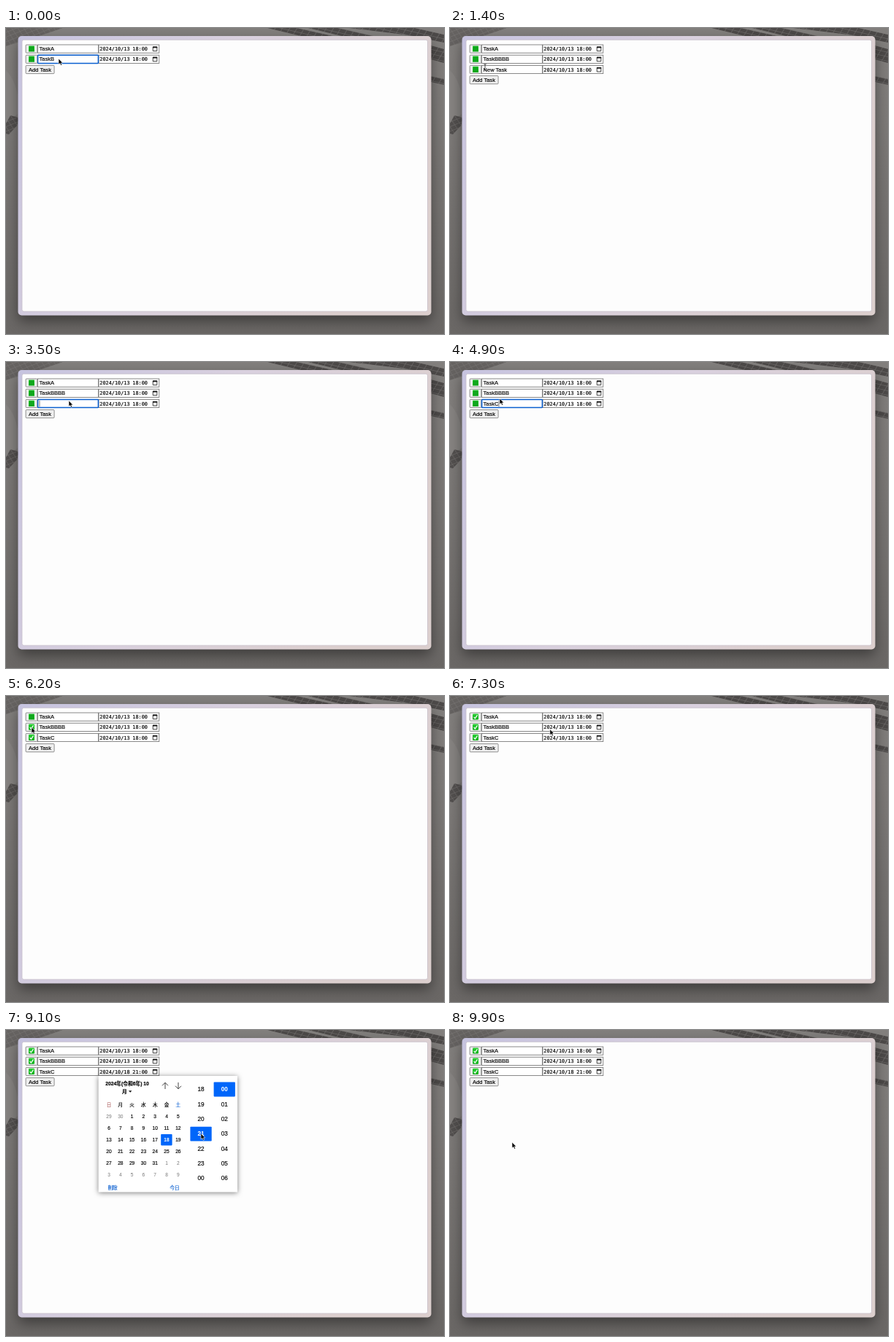
Recreate the animation shown at these times as an HTML page. Size 600 by 420 pixels, loop 10 s.

```html
<!DOCTYPE html>
<html lang="en">
<head>
<meta charset="utf-8">
<title>Task list</title>
<style>
html, body { margin: 0; width: 100%; height: 100%; overflow: hidden; background: #74716f; }
svg { display: block; width: 600px; height: 420px; }
text { font: 7.55px "Liberation Sans", Arial, sans-serif; fill: #000; stroke: #000; stroke-width: .16px; }
.mono { font: 6.85px "DejaVu Sans Mono", monospace; }
.cal text { font: 6.6px "Liberation Sans", "Noto Sans CJK JP", "Noto Sans CJK", sans-serif; text-anchor: middle; }
.cal .time { font-size: 8.2px; }
.cal .head { font-size: 6.75px; font-weight: bold; }
.cal .on { fill: #fff; stroke: none; font-weight: bold; }
.cal .dim { fill: #777; stroke: none; }
.cal .sun { fill: #a04848; stroke: none; }
.cal .link { fill: #0b5fd0; stroke: #0b5fd0; }
.box { fill: #fff; stroke: #6c6c6c; stroke-width: .8; }
.btn { fill: #efefef; stroke: #6c6c6c; stroke-width: .75; }
.frame { filter: drop-shadow(0 8px 9px rgba(0, 0, 0, .42)); }
.panel { filter: drop-shadow(0 1px 3.5px rgba(0, 0, 0, .5)); }
</style>
</head>
<body>
<svg viewBox="0 0 600 420">
  <defs>
    <linearGradient id="ground" x2="0" y2="1">
      <stop offset="0" stop-color="#827f7d"/>
      <stop offset=".3" stop-color="#7d7a78"/>
      <stop offset="1" stop-color="#6a6765"/>
    </linearGradient>
    <linearGradient id="edge" x2="1" y2=".35">
      <stop offset="0" stop-color="#c6c3df"/>
      <stop offset=".5" stop-color="#d9d0de"/>
      <stop offset="1" stop-color="#dccfce"/>
    </linearGradient>
    <linearGradient id="green" x2="0" y2="1">
      <stop offset="0" stop-color="#2ad033"/>
      <stop offset="1" stop-color="#0cae1b"/>
    </linearGradient>
    <pattern id="tiles" width="9" height="6" patternUnits="userSpaceOnUse" patternTransform="rotate(13) skewX(-18)">
      <path d="M0 0H9V6H0Z" fill="#716e6c"/>
      <path d="M0 0H8.3V5.4H0Z" fill="#4d4a49"/>
    </pattern>
    <pattern id="tilesLeft" width="7" height="6" patternUnits="userSpaceOnUse" patternTransform="rotate(-22) skewX(12)">
      <path d="M0 0H7V6H0Z" fill="#716e6c"/>
      <path d="M0 0H6.4V5.4H0Z" fill="#53504f"/>
    </pattern>
    <clipPath id="hours"><path d="M250 70H316V214H250Z"/></clipPath>
  </defs>

  <path d="M0 0H600V420H0Z" fill="url(#ground)"/>
  <path d="M0 58Q12 70 16 92V118L0 130Z" fill="#868381"/>
  <g fill="url(#tilesLeft)">
    <path d="M0 0H78L48 10L0 25Z" opacity=".6"/>
    <path d="M6 120L18 123L15 134L4 146L0 145V131Z"/>
  </g>
  <g fill="url(#tiles)">
    <path d="M358 0H398L452 12H408Z"/>
    <path d="M414 0H455L512 13H468Z"/>
    <path d="M470 0H560L600 9V20L545 9Z"/>
    <path d="M582 24L600 29V48L582 43Z"/>
    <path d="M582 66L600 70V78L582 74Z"/>
  </g>
  <rect class="frame" x="16.5" y="11" width="566" height="383.5" rx="5" fill="url(#edge)"/>
  <rect x="22" y="16.3" width="555.5" height="372.7" rx="2.5" fill="#fdfdfd" stroke="#c3bbc6" stroke-width=".7"/>
  <g id="app"></g>
</svg>
<script>
const LOOP = 10000, STEP = 100, PITCH = 14.2;
const app = document.getElementById('app');
const BLUE = '#0066fa';

// Pointer path: time, x, y
const path = [
  [0, 72, 42], [600, 72, 42], [950, 46, 57], [1100, 46, 57], [1400, 48, 53],
  [1700, 45, 56], [2300, 86, 56], [2700, 86, 53], [4300, 86, 53], [4800, 68, 50],
  [5000, 68, 50], [5400, 35, 58], [5600, 35, 58], [6000, 35, 43], [6300, 35, 43],
  [6600, 35, 28], [6900, 35, 28], [7600, 203, 57], [8200, 203, 57], [8500, 221, 151],
  [8700, 221, 151], [9000, 267, 142], [9300, 267, 142], [9700, 85, 154], [LOOP, 85, 154]
];

const label = (x, y, s, cls = '') => `<text class="${cls}" x="${x}" y="${y}">${s}</text>`;
const rect = (x, y, w, h, attr) => `<rect x="${x}" y="${y}" width="${w}" height="${h}" ${attr}/>`;
const pad = n => String(n).padStart(2, '0');
const ease = p => p * p * (3 - 2 * p);
const typed = (s, t, start, gap) => s.slice(0, Math.max(0, Math.floor((t - start) / gap) + 1));

const ruler = document.createElement('canvas').getContext('2d');
ruler.font = '7.55px "Liberation Sans", Arial, sans-serif';
const widthOf = s => ruler.measureText(s).width;

function pointerAt(t) {
  const i = path.findIndex(p => p[0] > t);
  const [t0, x0, y0] = path[i - 1], [t1, x1, y1] = path[i];
  const p = ease((t - t0) / (t1 - t0));
  return [x0 + (x1 - x0) * p, y0 + (y1 - y0) * p];
}

function pointer(t) {
  const [x, y] = pointerAt(t);
  const beam = t >= 1300 && t < 2700;
  const d = beam
    ? 'M-1.7-3.6Q0-3.6 0-2.4Q0-3.6 1.7-3.6M0-2.4V4M-1.7 5.2Q0 5.2 0 4Q0 5.2 1.7 5.2'
    : 'M0 0V8.1L1.9 6.4L3.2 9.3L4.6 8.7L3.4 5.9H5.7Z';
  const look = beam ? 'fill="none" stroke="#222" stroke-width=".8"' : 'fill="#000" stroke="#fff" stroke-width=".6"';
  return `<path transform="translate(${x} ${y})" d="${d}" ${look}/>`;
}

function status(y, done) {
  let s = rect(31, y - 4.2, 8, 8.2, `rx="${done ? 1.3 : .6}" fill="url(#green)"`);
  if (done) s += `<path d="M32.7 ${y + .2}L34.4 ${y + 2.2}L37.5 ${y - 2.5}" fill="none" stroke="#fff" stroke-width="1.2"/>`;
  else s += rect(32.2, y - 3, 5.6, 5.8, 'fill="#0fa91d" stroke="#0c9018" stroke-width=".4"');
  return s;
}

function row(i, { name, done, day = 13, hour = 18, focus, selected, caret }) {
  const y = 28.6 + i * PITCH, base = y + 2.5;
  let s = rect(27.1, y - 5.6, 15.8, 11.2, 'rx="1" class="btn"') + status(y, done);
  s += rect(43.4, y - 5.6, 83, 11.2, 'class="box"');
  s += rect(127, y - 5.6, 82.8, 11.2, 'class="box"');
  if (focus) s += rect(43.6, y - 5.6, 82.8, 11.2, 'rx=".8" fill="#fff" stroke="#0a5fd0" stroke-width="1.5"');
  if (selected) s += rect(45.5, y - 4.2, selected, 8.6, 'fill="#b4d5fe"');
  s += label(45.5, base, name);
  if (caret) s += rect(45.7 + widthOf(name), y - 4.2, .6, 8.6, 'fill="#222"');
  s += label(128.3, base, `2024/10/${day}`, 'mono') + label(173.3, base, `${hour}:00`, 'mono');
  s += `<path d="M201.3 ${y - 2.6}H206.8V${y + 3}H201.3Z" fill="none" stroke="#111" stroke-width=".8"/>`;
  s += rect(201, y - 3, 6.2, 1.7, 'fill="#111"');
  return s;
}

function calendar(t, day) {
  let s = rect(126.7, 63, 190.3, 159.5, 'class="panel" fill="#fff"');
  s += label(166, 76.4, '2024年(令和6年) 10', 'head') + label(162.5, 86.8, '月', 'head');
  s += '<path d="M168 83.3H172.4L170.2 85.8Z" fill="#111"/>';
  s += '<path d="M218 81V72.3M214 76.3L218 72.3L222 76.3M236 72V80.8M232 76.8L236 80.8L240 76.8" fill="none" stroke="#222" stroke-width=".85"/>';
  [...'日月火水木金土'].forEach((d, i) => {
    s += label(141 + i * 15.8, 104.8, d, i ? (i > 5 ? 'link' : '') : 'sun');
  });
  for (let i = 0; i < 42; i++) {
    const n = i - 1, x = 141 + i % 7 * 15.8, y = 119 + Math.floor(i / 7) * 15.9;
    const on = n === day;
    if (on) s += rect(x - 7.8, y - 7.8, 15.4, 15.4, `rx=".8" fill="${BLUE}"`);
    const shown = n < 1 ? n + 30 : n > 31 ? n - 31 : n;
    s += label(x, y + 2.3, shown, on ? 'on' : n < 1 || n > 31 ? 'dim' : '');
  }
  s += label(146, 219.4, '削除', 'link') + label(231, 219.4, '今日', 'link');

  const hour = t < 9100 ? 18 : 21;
  const scroll = 3 * ease(Math.min(1, Math.max(0, (t - 9100) / 300)));
  const column = (x, first, mod, chosen, offset) => {
    for (let k = 0; k < 11; k++) {
      const y = 81.4 + (k - offset) * 20.35, n = (first + k) % mod, on = n === chosen;
      if (on) s += rect(x - 14.6, y - 9.8, 29.3, 19.8, `rx=".8" fill="${BLUE}"`);
      if (y < 212) s += label(x, y + 2.8, pad(n), on ? 'time on' : 'time');
    }
  };
  s += '<g clip-path="url(#hours)">';
  column(267, 18, 24, hour, scroll);
  column(299.2, 0, 60, 0, 0);
  return `<g class="cal">${s}</g></g>`;
}

function draw(t) {
  const blink = t % 1000 >= 500;
  const day = t < 8600 ? 13 : 18, hour = t < 9100 ? 18 : 21;
  const rows = [
    { name: 'TaskA', done: t >= 6700 },
    { name: 'TaskB' + typed('BBB', t, 200, 150), done: t >= 6100, focus: t < 1000, caret: t < 1000 && blink }
  ];
  if (t >= 1100) {
    const editing = t >= 1700 && t < 5500;
    const name = t < 2900 ? 'New Task' : typed('TaskC', t, 3800, 200);
    const selected = t >= 1700 && t < 2900 ? Math.min(widthOf(name), Math.max(0, pointerAt(t)[0] - 45.5)) : 0;
    rows.push({ name, done: t >= 5500, day, hour, focus: editing, selected, caret: editing && t >= 2900 && blink });
  }
  const y = 28.6 + rows.length * PITCH;
  app.innerHTML = rows.map((r, i) => row(i, r)).join('')
    + rect(27.1, y - 5.6, 39, 11.2, 'rx="1" class="btn"') + label(31, y + 2.5, 'Add Task')
    + (t >= 7800 && t < 9700 ? calendar(t, day) : '') + pointer(t);
}

let last = -1;
function tick() {
  const t = Math.floor(performance.now() % LOOP / STEP) * STEP;
  if (t !== last) draw(last = t);
  requestAnimationFrame(tick);
}
tick();
</script>
</body>
</html>
```
